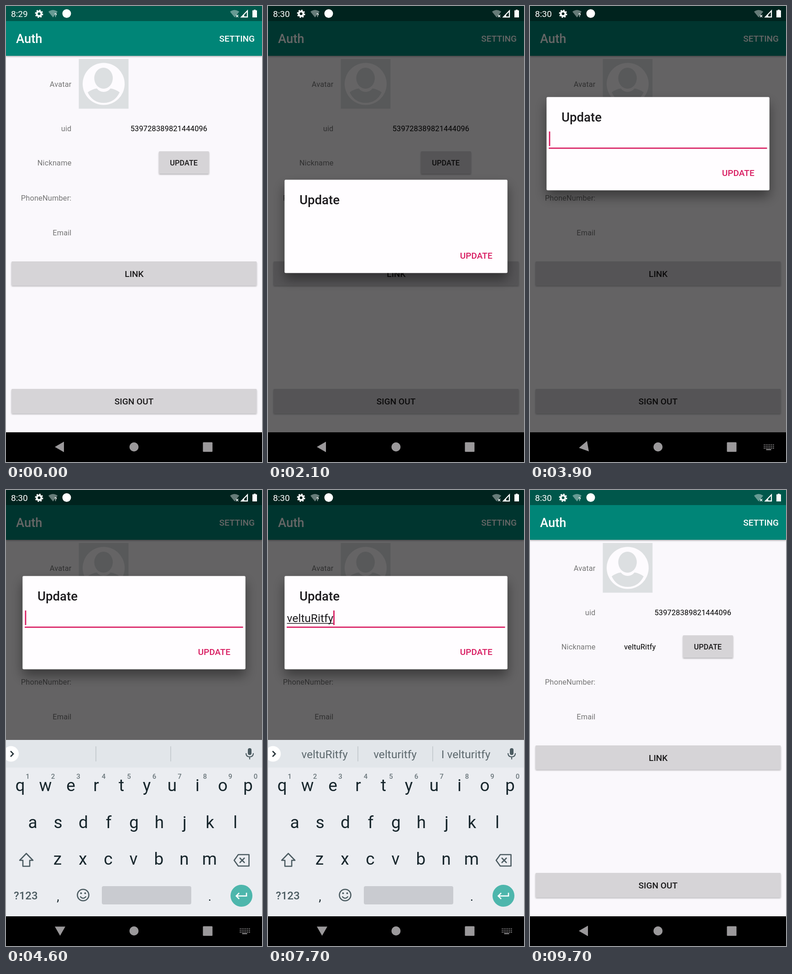
These frames come from a looping animation (561x998 px, 9.8 s). An HTML page:

```html
<!DOCTYPE html>
<html lang="en">
<head>
<meta charset="utf-8">
<title>Auth</title>
<style>
html, body { margin: 0; width: 100%; height: 100%; overflow: hidden; background: #faf8fc; }
svg { display: block; width: 561px; height: 998px; font-family: Roboto, sans-serif; }
text { white-space: pre; }
.m { text-anchor: middle; }
.e { text-anchor: end; }
.b { font-weight: 500; }
.small { font-size: 16.37px; letter-spacing: .01em; }
.cap { font-size: 19.1px; font-weight: 500; }
.line { fill: none; stroke: #4b5b61; stroke-width: 2.6; }
</style>
</head>
<body>
<svg viewBox="0 0 561 998">
  <defs>
    <filter id="low" x="-10%" y="-30%" width="120%" height="170%">
      <feDropShadow dx="0" dy="2" stdDeviation="1.6" flood-opacity=".28"/>
    </filter>
    <filter id="high" x="-15%" y="-30%" width="130%" height="180%">
      <feDropShadow dx="0" dy="14" stdDeviation="13" flood-opacity=".42"/>
    </filter>
    <clipPath id="aboveNav"><rect width="561" height="933"/></clipPath>
  </defs>

  <rect width="561" height="998" fill="#faf8fc"/>
  <g id="page">
    <rect y="20" width="561" height="89" fill="#008577" filter="url(#low)"/>
    <rect width="561" height="33" fill="#00574b"/>
    <text x="22" y="81" class="b" font-size="27.3" fill="#fff">Auth</text>
    <text x="506.2" y="78" class="cap m" fill="#fff">SETTING</text>

    <rect x="159.5" y="116" width="109" height="108.7" fill="#dcdfe1"/>
    <circle cx="214" cy="170.5" r="46" fill="#fdfbfe"/>
    <ellipse cx="213.7" cy="158" rx="20.3" ry="23" fill="#dcdfe1"/>
    <path d="M179 189Q188 182 199 180.5Q205 188 214 188Q223 188 229 180.5Q240 182 249 189Q238 212 214 212Q190 212 179 189Z" fill="#dcdfe1"/>

    <g class="small e" fill="#757575">
      <text x="143.5" y="177">Avatar</text>
      <text x="143.5" y="274">uid</text>
      <text x="143.5" y="349">Nickname</text>
      <text x="143.5" y="425.5">PhoneNumber:</text>
      <text x="143.5" y="502">Email</text>
    </g>
    <text x="357" y="274" class="small m">539728389821444096</text>
    <text id="nick" x="241" y="349" class="small m"></text>

    <g fill="#d6d4d7" filter="url(#low)">
      <rect id="upBtn" x="335" y="318" width="110" height="49" rx="2"/>
      <rect x="12" y="559" width="537.5" height="52.5" rx="2"/>
      <rect x="12" y="838" width="537.5" height="53.5" rx="2"/>
    </g>
    <g class="m b" fill="#1b1a1b">
      <text x="389.7" y="349" font-size="16.37">UPDATE</text>
      <text x="281" y="592.5" font-size="19.1">LINK</text>
      <text x="280.5" y="871.5" font-size="19.1">SIGN OUT</text>
    </g>
  </g>

  <rect id="dim" width="561" height="998"/>

  <g id="dialog">
    <rect x="36.3" width="488.4" height="204" rx="2.5" fill="#fffdff" filter="url(#high)"/>
    <text x="69" y="53.5" class="b" font-size="27.6" fill="#1d1b1e">Update</text>
    <text x="456.3" y="173" class="cap m" fill="#d81b60">UPDATE</text>
    <g id="field">
      <rect x="41" y="110.7" width="478.5" height="2.7" fill="#d81b60"/>
      <text id="input" x="41.5" y="101" font-size="24.55" fill="#1d1b1e"></text>
      <rect id="under" x="41.5" y="103" height="1.5" fill="#1d1b1e"/>
      <rect id="cursor" y="75.5" width="2.8" height="32" fill="#d81b60"/>
    </g>
  </g>

  <g clip-path="url(#aboveNav)">
    <g id="kb">
      <rect y="547" width="561" height="386" fill="#ebedf1"/>
      <rect y="547" width="561" height="60.5" fill="#e2e6ea"/>
      <circle cx="11" cy="577.5" r="17" fill="#fff"/>
      <path d="M10 571.5l6 6-6 6" class="line" style="stroke:#263238"/>
      <path d="M197 561v33M361 561v33" stroke="#bcc2c6" stroke-width="1.4"/>
      <g id="hints" class="m" font-size="24.55" fill="#5d696e"></g>
      <rect x="530" y="565" width="8" height="15" rx="4" fill="#4b5b61"/>
      <path d="M526 576q0 8 8 8t8-8M534 584v5.5" class="line" style="stroke-width:2.2"/>
      <g id="keys" class="m"></g>
      <path id="shift" d="M44.5 795.5L59 810.5H52V823.5H37V810.5H30Z" class="line" stroke-linejoin="round"/>
      <path d="M509 798H532.5V823H509L500 810.500Z M512 805l11 11M523 805l-11 11" class="line" stroke-linejoin="round"/>
      <text x="17" y="896" class="b" font-size="24" fill="#4b5b61">?123</text>
      <g class="m" font-size="27" fill="#17262c">
        <text x="114" y="899">,</text><text x="446.500" y="899">.</text>
      </g>
      <circle cx="169" cy="886.5" r="12.5" class="line"/>
      <path d="M162.500 889.500q6.500 8 13 0" class="line" style="stroke-width:2.2"/>
      <circle cx="164.5" cy="882.5" r="2" fill="#4b5b61"/>
      <circle cx="173.5" cy="882.5" r="2" fill="#4b5b61"/>
      <rect x="210" y="867" width="196" height="40" rx="4" fill="#c9cbd0"/>
      <circle cx="516" cy="888" r="24" fill="#4db6ac"/>
      <path d="M527 881.5V888.500H505M511 882l-6.500 6.500 6.500 6.500" class="line" style="stroke:#fff"/>
    </g>
  </g>

  <g fill="#fff">
    <text id="clock" x="11" y="24" font-size="19.1"></text>
    <circle cx="72.500" cy="17" r="5" fill="none" stroke="#fff" stroke-width="4"/>
    <circle cx="72.500" cy="17" r="7.7" fill="none" stroke="#fff" stroke-width="2.6" stroke-dasharray="3.2 2.85"/>
    <path d="M103 25L93 12.500Q103 5 113 12.500Z" opacity=".4"/>
    <text x="106" y="24" font-size="11" font-weight="700">?</text>
    <circle cx="133" cy="16.500" r="9.500"/>
    <path d="M501 25L491 12.500Q501 5 511 12.500Z" opacity=".4"/>
    <path d="M504 19.500l5 5M509 19.500l-5 5" stroke="#fff" stroke-width="1.6"/>
    <path d="M516 24H529V10.500Z" fill="none" stroke="#fff" stroke-width="2.300"/>
    <path d="M516 24H522V17.500Z"/>
    <path d="M540 9.500H543V8H547V9.500H550V25H540Z"/>
  </g>

  <rect id="nav" width="561" height="70"/>
  <g fill="#9b999b">
    <path id="back" d="M-11 .5L9-11V12Z"/>
    <circle cx="280.500" cy="965" r="10"/>
    <rect x="431.500" y="954.700" width="21" height="21" rx="1.500"/>
    <g id="kbIcon">
      <path d="M512.500 960.500H534.500M512.500 964.500H534.500M512.500 968H534.500" stroke="#9b999b" stroke-width="2" stroke-dasharray="2 2"/>
      <rect x="517.500" y="970" width="11" height="2"/>
    </g>
  </g>
</svg>
<script>
const LOOP = 9800, STEP = 100;
const NAME = "veltuRitfy";
const STROKES = [4900, 5100, 5300, 5400, 5600, 6200, 6500, 6800, 7000, 7300];
const $ = id => document.getElementById(id);
const set = (el, attrs) => { for (const k in attrs) el.setAttribute(k, attrs[k]); };
const show = (el, on) => el.setAttribute("visibility", on ? "visible" : "hidden");
const ramp = (t, a, b) => Math.min(1, Math.max(0, (t - a) / (b - a)));
const mix = (a, b, p) => a + (b - a) * p;

function addText(parent, x, y, str, attrs = {}) {
  const el = document.createElementNS("http://www.w3.org/2000/svg", "text");
  set(el, { x, y, ...attrs });
  el.textContent = str;
  return parent.appendChild(el);
}

const letters = [];
[["qwertyuiop", 31, 659], ["asdfghjkl", 58.5, 740], ["zxcvbnm", 113, 820]].forEach(([row, x0, y], r) => {
  [...row].forEach((c, i) => {
    const x = x0 + 55.5 * i;
    letters.push([c, addText($("keys"), x, y, c, { "font-size": 37, fill: "#17262c" })]);
    if (!r) addText($("keys"), x + 16.5, 632, (i + 1) % 10, { "font-size": 15, class: "b", fill: "#6a767b" });
  });
});
const hints = [124, 278.5, 433.5].map(x => addText($("hints"), x, 587, ""));

function suggest(typed) {
  const n = typed.length, low = typed.toLowerCase();
  if (!n) return ["", "", ""];
  if (n < 6) return [typed, typed[0].toUpperCase() + typed.slice(1), "Veltie"];
  return [typed, low, n > 7 ? "I " + low : "Veltie"];
}

function draw(t) {
  const enter = ramp(t, 1950, 2090);
  const lift = 1 - (1 - ramp(t, 3820, 3950)) ** 3;
  const slide = ramp(t, 3900, 4200);
  const exit = ramp(t, 8400, 8622);
  const typed = NAME.slice(0, STROKES.filter(s => t >= s).length);
  const upper = t >= 5900 && t < 6200;

  $("clock").textContent = t < 1000 ? "8:29" : "8:30";
  $("nick").textContent = t >= 8400 ? NAME : "";
  set($("upBtn"), { fill: t >= 1800 && t < 2000 ? "#b9b8ba" : "#d6d4d7" });
  set($("dim"), { opacity: .6 * enter * (1 - exit) ** 1.6 });

  set($("dialog"), {
    transform: `translate(0 ${mix(380.3, 188.2, lift)})`,
    opacity: enter * (1 - exit) ** 3.5
  });
  show($("field"), t >= 2200);
  $("input").textContent = typed;
  const w = typed ? $("input").getComputedTextLength() : 0;
  set($("under"), { width: w });
  set($("cursor"), { x: 41.5 + w });
  set($("cursor"), { opacity: exit > 0 ? 0 : 1 });

  const drop = 31 * (exit > 0 ? exit : (1 - slide) ** 2);
  set($("kb"), {
    transform: `translate(0 ${drop})`,
    opacity: exit > 0 ? 1 - exit ** 1.9 : slide
  });
  letters.forEach(([c, el]) => { el.textContent = upper ? c.toUpperCase() : c; });
  $("shift").style.fill = upper ? "#4b5b61" : "none";
  suggest(typed).forEach((s, i) => { hints[i].textContent = s; });

  set($("nav"), { y: 933 + (exit < 1 ? 31 * exit : 0) });
  const turn = -90 * ramp(t, 3880, 4060) * (1 - exit);
  set($("back"), { transform: `translate(118 964.5) rotate(${turn})` });
  show($("kbIcon"), t >= 3880 && t < 8400);
}

const start = performance.now();
function tick() {
  const t = (performance.now() - start) % LOOP;
  draw(Math.floor(t / STEP) * STEP);
  requestAnimationFrame(tick);
}
tick();
</script>
</body>
</html>
```
